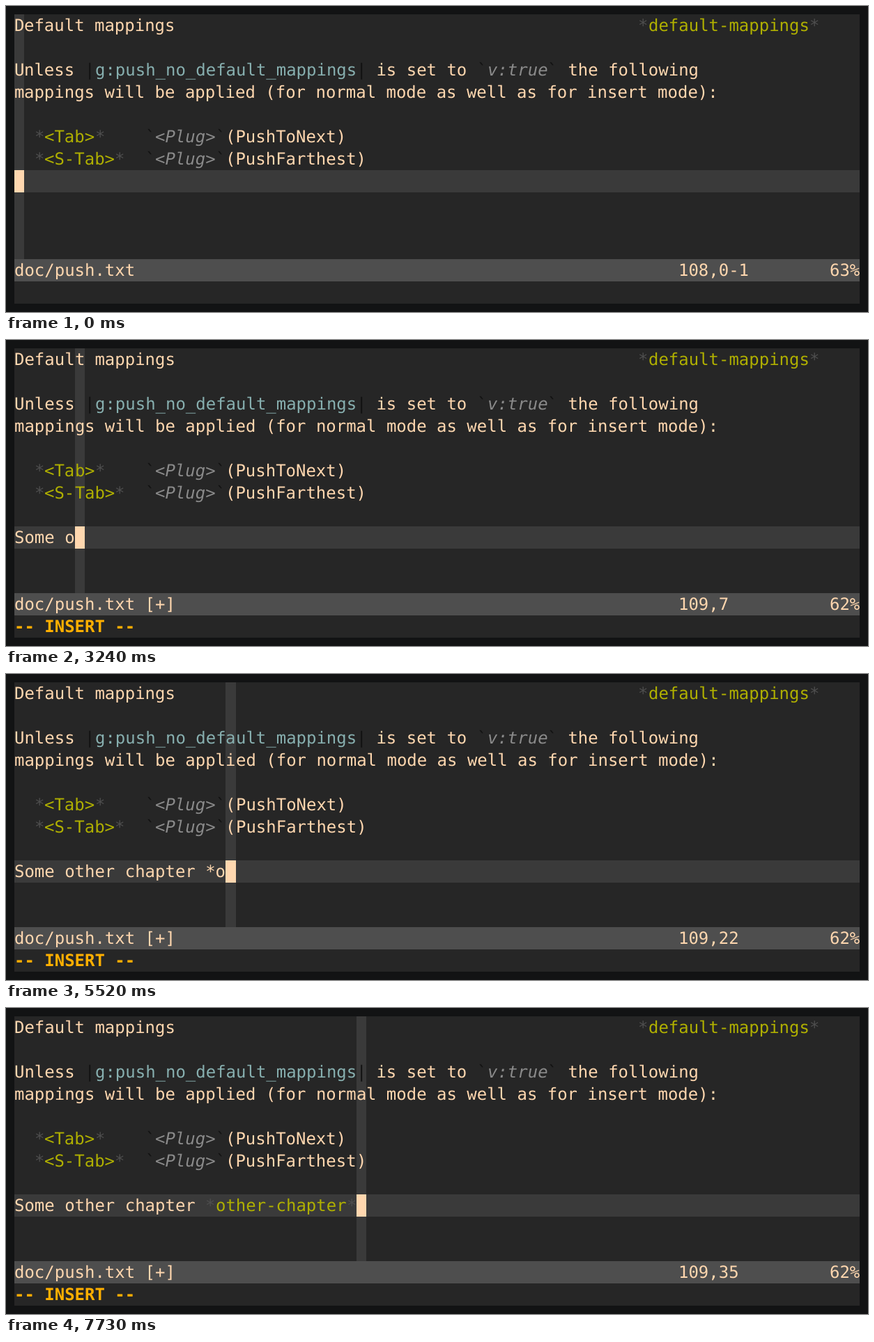
Write an HTML page that moves like this. It is 1237 px wide and 440 px high and loops after 8000 ms.

```html
<!DOCTYPE html>
<html lang="en">
<head>
<meta charset="utf-8">
<title>Editor</title>
<style>
  html, body { margin: 0; width: 100%; height: 100%; overflow: hidden; background: #121314; }
  #screen { position: absolute; left: 12px; top: 12px; width: 1213px; height: 416px; background: #262626; }
  #screen * { position: absolute; }
  #screen span {
    font-family: "DejaVu Sans Mono", monospace;
    line-height: 32px;
    text-rendering: geometricPrecision;
    white-space: pre;
    color: #ffd7af;
  }
  #screen .tag { color: #afaf00; }
  #screen .star { color: #4e4e4e; }
  #screen .link { color: #87afaf; }
  #screen .mark { color: #121212; }
  #screen .code { color: #8a8a8a; font-style: italic; }
  #screen .mode { color: #ffaf00; font-weight: bold; }
  #line, #column { background: #3a3a3a; }
  #line { left: 0; width: 100%; height: 32px; }
  #column { top: 0; height: 352px; }
  #status { left: 0; top: 352px; width: 100%; height: 32px; background: #4e4e4e; }
  #cursor { height: 32px; background: #ffd7af; }
</style>
</head>
<body>
<div id="screen">
  <div id="line"></div>
  <div id="column"></div>
  <div id="status"></div>
  <div id="text"></div>
  <div id="cursor"></div>
</div>
<script>
const LOOP = 8000, OPEN_AT = 1390;
const ROW = 32, STATUS_ROW = 11;
const CELL = 1213 / 84;              // 84 columns fill the screen
const FONT_SIZE = CELL * 2048 / 1233; // advance of one glyph is 1233/2048 em

// Typing comes in bursts: text, time of its first key, time of its last
const BURSTS = [
  ["S", 2120], ["o", 2650], ["me", 2850, 2910], [" other", 3110, 3620], [" c", 3750, 3880],
  ["ha", 3940, 4000], ["pt", 4200, 4260], ["er", 4460], [" ", 4990], ["*", 5190], ["o", 5520],
  ["ther-", 5720, 6100], ["c", 6300], ["hap", 6490, 6680], ["ter", 6880, 7070], ["*", 7730]
];
const keys = BURSTS.flatMap(([text, first, last = first]) =>
  [...text].map((char, i) => ({
    char,
    at: first + (last - first) * i / Math.max(1, text.length - 1)
  })));

const $ = id => document.getElementById(id);
const edge = col => Math.round(col * CELL);
$("text").style.fontSize = FONT_SIZE + "px";

const tag = name => [["*", "star"], [name, "tag"], ["*", "star"]];
const code = text => [["`", "mark"], [text, "code"], ["`", "mark"]];

// Each entry: row, column, runs of [text, style]
const PAGE = [
  [0, 0, [["Default mappings"]]],
  [0, 62, tag("default-mappings")],
  [2, 0, [
    ["Unless "], ["|", "mark"], ["g:push_no_default_mappings", "link"], ["|", "mark"],
    [" is set to "], ...code("v:true"), [" the following"]
  ]],
  [3, 0, [["mappings will be applied (for normal mode as well as for insert mode):"]]],
  [5, 2, tag("<Tab>")],
  [5, 13, [...code("<Plug>"), ["(PushToNext)"]]],
  [6, 2, tag("<S-Tab>")],
  [6, 13, [...code("<Plug>"), ["(PushFarthest)"]]]
];

function put(row, col, text, style = "") {
  const el = document.createElement("span");
  el.className = style;
  el.textContent = text;
  el.style.left = edge(col) + "px";
  el.style.top = row * ROW + "px";
  $("text").append(el);
}

// The highlighted column cuts a run; every piece starts on a whole pixel
function putRuns(row, col, runs, cut) {
  for (const [text, style] of runs) {
    const at = Math.max(0, cut - col), after = Math.max(0, cut + 1 - col);
    for (const [from, to] of [[0, at], [at, after], [after, text.length]]) {
      const piece = text.slice(from, to);
      if (piece) put(row, col + from, piece, style);
    }
    col += text.length;
  }
}

function place(el, col) {
  el.style.left = edge(col) + "px";
  el.style.width = edge(col + 1) - edge(col) + "px";
}

// Text between two stars becomes a tag once it is closed
function styleLine(text) {
  const [head, name, tail] = text.split("*");
  return tail === undefined ? [[text]] : [[head], ...tag(name)];
}

function draw(insert, len) {
  const typed = keys.slice(0, len).map(key => key.char).join("");
  $("line").style.top = $("cursor").style.top = (insert ? 8 : 7) * ROW + "px";
  place($("column"), len);
  place($("cursor"), len);

  $("text").replaceChildren();
  for (const [row, col, runs] of PAGE) putRuns(row, col, runs, len);
  putRuns(8, 0, styleLine(typed), len);

  put(STATUS_ROW, 0, insert ? "doc/push.txt [+]" : "doc/push.txt");
  put(STATUS_ROW, 66, insert ? `109,${len + 1}` : "108,0-1");
  put(STATUS_ROW, 81, insert ? "62%" : "63%");
  if (insert) put(STATUS_ROW + 1, 0, "-- INSERT --", "mode");
}

const start = performance.now();
let shown = "";
function tick() {
  const t = (performance.now() - start) % LOOP;
  const insert = t >= OPEN_AT;
  const len = keys.filter(key => t >= key.at).length;
  const state = `${insert} ${len}`;
  if (state !== shown) draw(insert, len);
  shown = state;
  requestAnimationFrame(tick);
}
tick();
</script>
</body>
</html>
```
